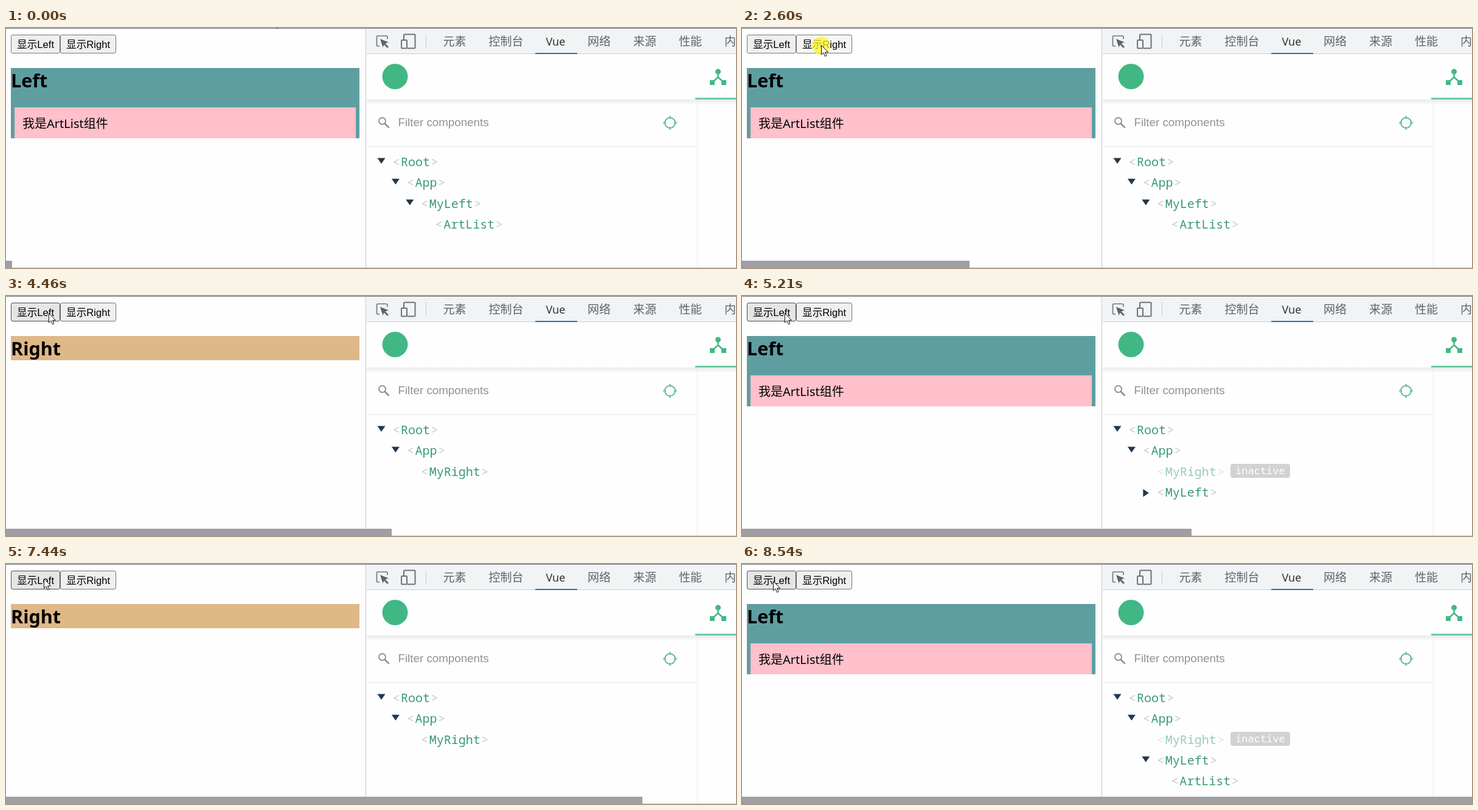
Animation of 1200 by 396 pixels, one loop 8610 ms. Source, as an HTML page:

```html
<!DOCTYPE html>
<html lang="zh">
<head>
<meta charset="utf-8">
<title>Component switching</title>
<style>
  html, body { margin: 0; width: 100%; height: 100%; overflow: hidden; background: #fff; }
  svg { display: block; width: 1200px; height: 396px; }
  text { white-space: pre; }
  .ui { font: 16.67px "Liberation Sans", "Noto Sans CJK SC", "Noto Sans CJK", sans-serif; }
  .body { font: 20px "Noto Sans", "Noto Sans CJK SC", "Noto Sans CJK", sans-serif; }
  .title { font: bold 30.5px "Noto Sans", sans-serif; }
  .tab { font: 19px "Noto Sans", "Noto Sans CJK SC", "Noto Sans CJK", sans-serif; fill: #5f6368; }
  .mono { font: 20px "Noto Sans Mono", monospace; fill: #3a9a74; }
  .bracket { fill: #c8c8c8; }
  .line { fill: none; stroke-width: 2; }
  .button { stroke: #767676; }
</style>
</head>
<body>
<svg viewBox="0 0 1200 396">
  <rect width="1200" height="396" fill="#fefefe"/>

  <!-- Page -->
  <rect id="leftButton" class="button" x="8.5" y="11.5" width="80" height="30" rx="2.5"/>
  <rect id="rightButton" class="button" x="89.5" y="11.5" width="91" height="30" rx="2.5"/>
  <text class="ui" x="18" y="33">显示Left</text>
  <text class="ui" x="99" y="33">显示Right</text>
  <g id="leftPanel">
    <rect x="8" y="66" width="573" height="116" fill="#5f9ea0"/>
    <rect x="14" y="131" width="561" height="51" fill="#ffc0cb"/>
    <text class="title" x="8" y="98">Left</text>
    <text class="body" x="27" y="165">我是ArtList组件</text>
  </g>
  <g id="rightPanel">
    <rect x="8" y="66" width="573" height="40" fill="#deb887"/>
    <text class="title" x="8" y="98">Right</text>
  </g>

  <!-- Developer tools -->
  <rect x="593" y="1" width="607" height="41" fill="#f1f3f4"/>
  <path d="M593 42.5H1200M690.5 10V34" stroke="#cbcdd1"/>
  <g class="line" stroke="#6e7276">
    <path d="M614 30H611Q609.5 30 609.5 28V15Q609.5 13 611.5 13H625Q627 13 627 15V18" stroke-width="1.6"/>
    <path d="M654 19V12Q654 10.500 655.500 10.500H671Q672.500 10.500 672.500 12V32Q672.500 33.500 671 33.500H660"/>
    <rect x="650" y="20" width="9" height="13.500" rx="1"/>
  </g>
  <path d="M615 18L629 23.500 623.500 25.500 629 31 627 33 621.500 27.500 619.500 32Z" fill="#5f6368"/>
  <g class="tab">
    <text x="718.500" y="29">元素</text>
    <text x="793.500" y="29">控制台</text>
    <text x="887.500" y="29" font-size="18" style="font-size:18px" fill="#333">Vue</text>
    <text x="956" y="29">网络</text>
    <text x="1031" y="29">来源</text>
    <text x="1106" y="29">性能</text>
    <text x="1181" y="29">内</text>
  </g>
  <rect x="870" y="41" width="69" height="2" fill="#1a73c8"/>

  <defs>
    <linearGradient id="shade" x2="0" y2="1">
      <stop stop-color="#e9e9e9"/><stop offset="1" stop-color="#fefefe"/>
    </linearGradient>
  </defs>
  <rect x="593" y="118" width="607" height="9" fill="url(#shade)"/>
  <circle cx="639.500" cy="80" r="21" fill="#41b883"/>
  <g fill="#41b883">
    <circle cx="1170.500" cy="72" r="4.500"/>
    <rect x="1157" y="86" width="8" height="8"/>
    <rect x="1176" y="86" width="8" height="8"/>
    <path class="line" d="M1170.500 72V81L1161 90M1170.500 81L1180 90" stroke="#41b883" style="stroke-width:2.500"/>
    <rect x="1133" y="115" width="67" height="3" fill="#6ccaa0"/>
  </g>
  <path d="M593 195.500H1136M1136.500 118V396" stroke="#e8e8e8"/>
  <g class="line" stroke="#8f8f8f">
    <circle cx="618.500" cy="153.500" r="5.500"/>
    <path d="M622.500 157.500L629.500 164.500" style="stroke-width:2.500"/>
  </g>
  <text class="ui" x="644.500" y="162" fill="#919191" style="font-size:18.75px">Filter components</text>
  <g class="line" stroke="#68b9a1">
    <circle cx="1091.500" cy="156.500" r="8.500"/>
    <path d="M1091.500 145V150M1091.500 163V168M1080 156.500H1085M1098 156.500H1103"/>
  </g>
  <g id="tree"></g>

  <path d="M0 .5H1200" stroke="#716d7a"/>
  <path d="M591.500 1V396" stroke="#c4c4c8"/>
  <path d="M0 395.500H1200" stroke="#c8c8cc"/>
  <circle id="highlight" r="15" fill="#fff52c" opacity=".75"/>
  <path id="cursor" d="M.5 .5V16L4 12.800 6.500 18.800 9 17.700 6.500 12H11.500Z" fill="#fff" stroke="#111"/>
  <rect id="progress" y="384" height="12" fill="#a09ea5"/>
</svg>
<script>
const LOOP = 8610;
const FRAMES = 125;
const BLOCK = 13;
// Start time of every block of 13 frames, the first beginning at frame 1.
const BLOCK_STARTS = [70, 950, 1850, 2730, 3620, 4530, 5420, 6330, 7230, 8130, 9018];
const CLICKS = [39, 71, 87, 112];
const PRESS_FRAMES = 3;
// Cursor stops: time, x, y
const STOPS = [
  [0, 438, -18], [1400, 155, 65], [1750, 130, 28], [2700, 130, 28],
  [3500, 181, 67], [3680, 181, 67], [4400, 70, 28], [5250, 70, 28],
  [5800, 121, 25], [6300, 121, 25], [6950, 62, 24], [7440, 62, 24], [7950, 51, 28]
];
const $ = id => document.getElementById(id);

function treeRow(row, depth, name, arrow = "", inactive = false) {
  const x = 649 + depth * 23.4;
  const y = 228 + row * 34.3;
  const end = x + name.length * 12;
  const ax = x - 32;
  const ay = y - 9;
  const arrows = {
    down: `M${ax - 6.5} ${ay - 4.5}h13l-6.500 9.500z`,
    right: `M${ax - 4.5} ${ay - 3.5}v13l9.500 -6.500z`
  };
  const badge = inactive ? `<rect x="803" y="277" width="98" height="23" rx="4" fill="#d2d2d2"/>
    <text class="mono" x="811" y="294" style="font-size:17px;font-weight:500;fill:#fff">inactive</text>` : "";
  return `${arrow && `<path d="${arrows[arrow]}" fill="#23384e"/>`}
    <g class="mono" opacity="${inactive ? .5 : 1}">
      <text class="bracket" x="${x - 13.5}" y="${y}">&lt;</text>
      <text x="${x}" y="${y}">${name}</text>
      <text class="bracket" x="${end + 1.5}" y="${y}">&gt;</text>
    </g>${badge}`;
}

const base = treeRow(0, 0, "Root", "down") + treeRow(1, 1, "App", "down");
const activeRight = treeRow(2, 2, "MyRight");
const inactiveRight = treeRow(2, 2, "MyRight", "", true);
const TREES = [
  treeRow(2, 2, "MyLeft", "down") + treeRow(3, 3, "ArtList"),
  activeRight,
  inactiveRight + treeRow(3, 2, "MyLeft", "right"),
  activeRight,
  inactiveRight + treeRow(3, 2, "MyLeft", "down") + treeRow(4, 3, "ArtList")
];

function frameAt(t) {
  if (t < BLOCK_STARTS[0]) return { frame: 0, time: 0 };
  const k = BLOCK_STARTS.findLastIndex(start => start <= t);
  const start = BLOCK_STARTS[k];
  const length = (BLOCK_STARTS[k + 1] - start) / BLOCK;
  const step = Math.min(BLOCK - 1, Math.floor((t - start) / length + .1));
  return { frame: Math.min(FRAMES - 1, 1 + BLOCK * k + step), time: start + step * length };
}

function cursorAt(t) {
  const i = STOPS.findIndex(stop => stop[0] > t);
  if (i < 0) return STOPS.at(-1).slice(1);
  const [t0, x0, y0] = STOPS[i - 1];
  const [t1, x1, y1] = STOPS[i];
  const u = (t - t0) / (t1 - t0);
  const eased = u * u * (3 - 2 * u);
  return [x0 + (x1 - x0) * eased, y0 + (y1 - y0) * eased].map(Math.round);
}

let shownView = -1;
function render(t) {
  const { frame, time } = frameAt(t);
  const [x, y] = cursorAt(time);
  const view = CLICKS.filter(click => click <= frame).length;
  const pressed = CLICKS.some(click => frame >= click - PRESS_FRAMES && frame < click);
  const paintButton = (id, from, to) => {
    const hover = x >= from && x < to && y >= 11 && y < 42;
    $(id).setAttribute("fill", !hover ? "#efefef" : pressed ? "#f5f5f5" : "#e5e5e5");
    $(id).style.stroke = hover && !pressed ? "#4f4f4f" : "#767676";
  };
  paintButton("leftButton", 8, 89);
  paintButton("rightButton", 89, 181);

  if (view !== shownView) {
    $("tree").innerHTML = base + TREES[view];
    $("leftPanel").style.display = view % 2 ? "none" : "";
    $("rightPanel").style.display = view % 2 ? "" : "none";
    shownView = view;
  }
  $("cursor").setAttribute("transform", `translate(${x} ${y})`);
  $("highlight").setAttribute("transform", `translate(${x} ${y + 1})`);
  $("highlight").style.display = pressed ? "" : "none";
  $("progress").setAttribute("width", Math.round((frame + 1) * 1200 / FRAMES));
}

const began = performance.now();
function tick() {
  render((performance.now() - began) % LOOP);
  requestAnimationFrame(tick);
}
tick();
</script>
</body>
</html>
```
